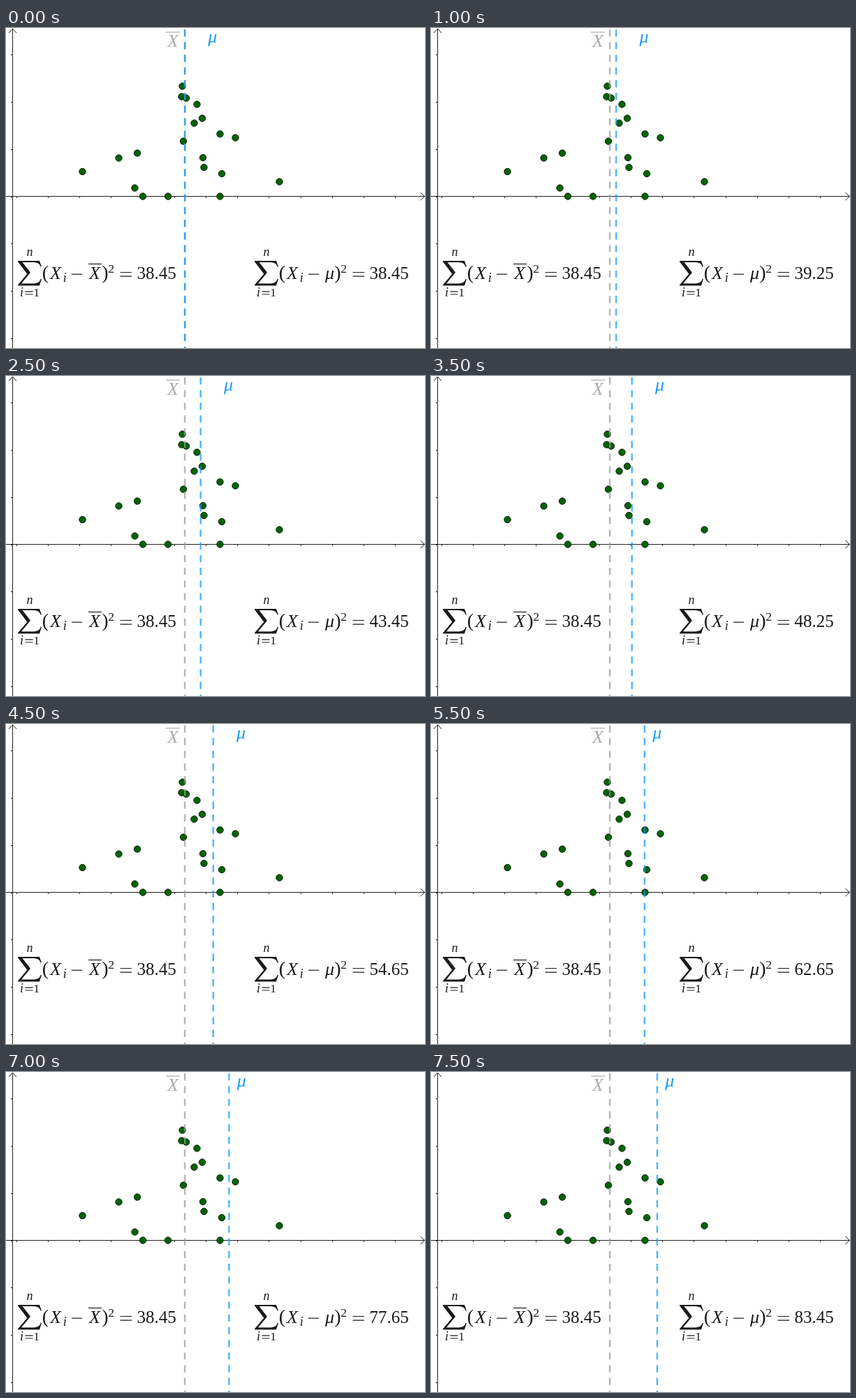
Recreate the animation shown at these times as an HTML page. Size 600 px wide and 459 px high, loop 8000 ms.

```html
<!DOCTYPE html>
<html lang="en">
<head>
<meta charset="utf-8">
<title>Sum of squares around the mean</title>
<style>
  html, body { margin: 0; width: 100%; height: 100%; overflow: hidden; background: #fff; }
  svg { display: block; width: 600px; height: 459px; }
  text { font-family: "Liberation Serif", "Times New Roman", serif; text-anchor: middle; }
  .var { font-style: italic; }
  .axis { fill: none; stroke: #222; stroke-width: 1; }
  .mean { fill: none; stroke-width: 2.5; stroke-opacity: .7; stroke-dasharray: 10.2 8; }
  .dot { fill: #006400; stroke: #0a1a0a; stroke-width: 1; }
  .rule { fill: none; stroke-width: 1.2; }
</style>
</head>
<body>
<svg id="stage" viewBox="0 0 600 459" xmlns="http://www.w3.org/2000/svg"></svg>
<script>
const stage = document.getElementById("stage");
const STEP_MS = 500, STEPS = 16;
const UNIT = 45.2, MEAN_X = 256.1;
const COUNT = 20, MIN_SUM = 38.45;
const GRAY = "#aaa", BLUE = "#1a9af8", INK = "#1a1a1a";

function add(tag, attrs, parent = stage) {
  const el = document.createElementNS("http://www.w3.org/2000/svg", tag);
  for (const name in attrs) el.setAttribute(name, attrs[name]);
  parent.appendChild(el);
  return el;
}

function write(parent, content, x, y, size, attrs = {}) {
  const el = add("text", { x, y, "font-size": size, ...attrs }, parent);
  el.textContent = content;
  return el;
}

const italic = { class: "var" };

function rule(parent, d, color = INK) {
  return add("path", { d, class: "rule", stroke: color }, parent);
}

function drawAxes() {
  let d = "M0 241.5H599M593.5 236l6 5.5l-6 5.5M9.5 459V1M4 7l5.5-6l5.5 6";
  for (let x = 15.8; x < 590; x += UNIT) d += `M${Math.round(x) - .5} 242v2`;
  for (let y = 38.1; y < 459; y += 1.5 * UNIT) d += `M7 ${Math.round(y) + .5}h2`;
  add("path", { d, class: "axis" });
}

function drawFormula(left, isSample) {
  const g = add("g", { transform: `translate(${left} 0)`, fill: INK });
  write(g, "n", 34, 327, 18, italic);
  add("path", {
    d: "M17 334H48L51 342.5H49.6C48 337 44.5 335.9 37 335.9H23.5L34.5 350.1" +
       "Q35 350.8 34.4 351.5L22 366.5H37C44.5 366.5 48 365.1 49.6 360H51L48 369.5H17V368.5" +
       "L30.3 352.7L17 335.3Z"
  }, g);
  write(g, "i", 22.5, 385, 18, italic);
  rule(g, "M27.5 378.2h11M27.5 382h11");
  write(g, "1", 43.5, 385, 17.5);

  write(g, "(", 56.5, 360, 28);
  write(g, "X", 71, 360, 26, italic);
  write(g, "i", 84.3, 364, 18, italic);
  rule(g, "M94 353.2h15");

  // The sample mean is wider than mu, which moves the rest of the line.
  const shift = isSample ? 0 : -6;
  if (isSample) {
    write(g, "X", 127, 360, 26, italic);
    rule(g, "M118 338.5h19");
  } else {
    write(g, "μ", 124.5, 360, 26, italic);
  }
  write(g, ")", 142 + shift, 360, 28);
  write(g, "2", 150.5 + shift, 350.5, 17.5);
  rule(g, `M${163.5 + shift} 350.5h16.5m-16.5 5.6h16.5`);
  return write(g, MIN_SUM.toFixed(2), 215.5 + shift, 360, 25);
}

function meanLine(color) {
  return add("path", { d: "M0 2V459", class: "mean", stroke: color });
}

drawAxes();
drawFormula(0, true);
const sumText = drawFormula(339, false);

const points = [
  [109.5, 206], [161.5, 186.5], [188, 179.5], [184.5, 229.5], [196, 241.5], [232, 241.5],
  [252.5, 83.5], [251.5, 98.5], [258, 100.5], [254, 162.5], [273.5, 109.5], [281, 129.5],
  [269.5, 136.5], [282, 186], [283.5, 200], [306.5, 152], [328.5, 157.5], [309, 209],
  [306.5, 241.5], [391.5, 220.5]
];
for (const [cx, cy] of points) add("circle", { cx, cy, r: 4.7, class: "dot" });

meanLine("#999").setAttribute("transform", `translate(${MEAN_X} 0)`);
const muLine = meanLine("#0a99ff");

write(stage, "X", 239, 26.5, 26, { class: "var", fill: GRAY });
rule(stage, "M229 6h20", GRAY);
const muLabel = write(stage, "μ", 0, 20.5, 26, { class: "var", fill: BLUE });

function render(ms) {
  const step = Math.floor(ms / STEP_MS) % STEPS;
  const offset = step / 10;
  const x = MEAN_X + offset * UNIT;
  muLine.setAttribute("transform", `translate(${x.toFixed(2)} 0)`);
  muLabel.setAttribute("x", x + (step < 10 ? 39.8 : 18));
  sumText.textContent = (MIN_SUM + COUNT * offset * offset).toFixed(2);
}

const start = performance.now();
function tick() {
  render(performance.now() - start);
  requestAnimationFrame(tick);
}
tick();
</script>
</body>
</html>
```
